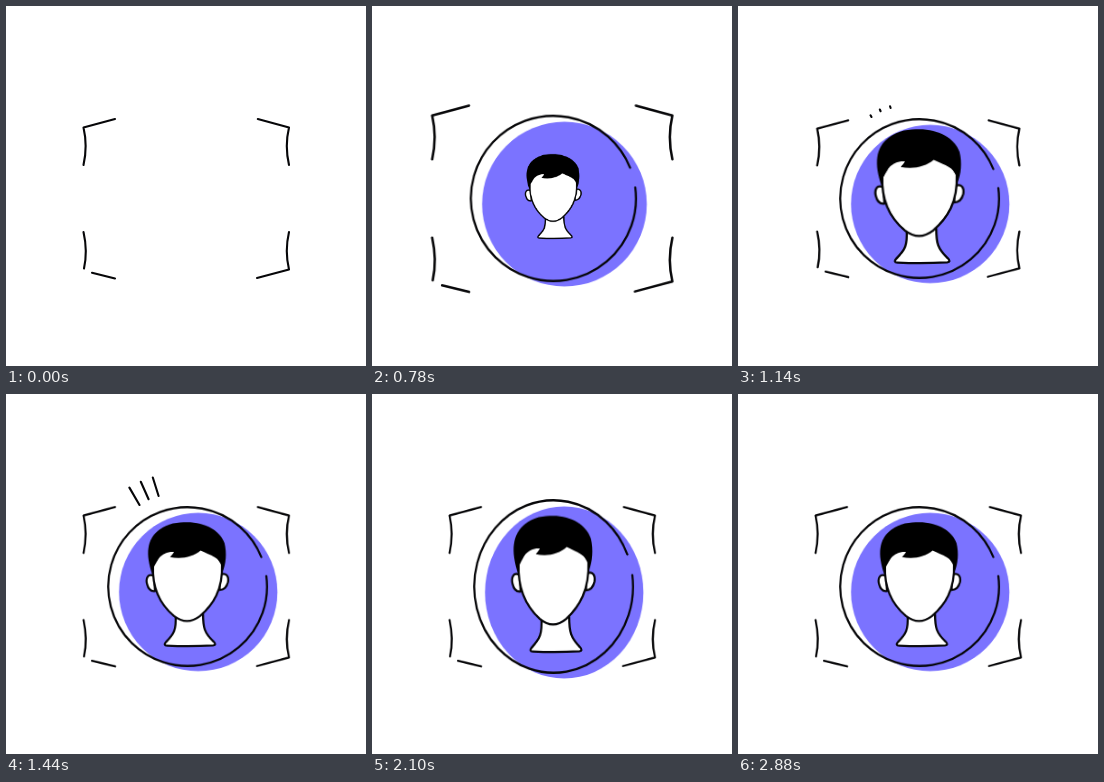
Write an HTML page that moves like this. It is 360x360 px and loops after 2910 ms.

```html
<!DOCTYPE html>
<html lang="en">
<head>
<meta charset="utf-8">
<title>Face scan</title>
<style>
  html, body { margin: 0; width: 100%; height: 100%; overflow: hidden; background: #fff; }
  svg { display: block; width: 100%; height: 100%; }
  .line { fill: none; stroke: #060608; stroke-width: 2.1; stroke-linecap: round; stroke-linejoin: round; }
  .skin { fill: #fff; }
  .trim { stroke-dasharray: 1 2; }

  .corners, .stretch, .disc, .disc-fill, .head, .tail, .tick {
    animation: 2910ms linear infinite;
  }
  .corners { transform-origin: 180.3px 192.5px; animation-name: push; }
  .stretch { transform-origin: 186px 193px; animation-name: stretch; }
  .disc { transform-origin: 186.5px 195.2px; animation-name: pop; }
  .disc-fill { animation-name: tint; }
  .head { transform-origin: 181px 190.3px; animation-name: face; }
  .tail { animation-name: tail; }
  .tick { animation-name: tick; }

  @keyframes push {
    0%, 20% { transform: scale(1); animation-timing-function: ease-in; }
    26.8% { transform: scale(1.168); animation-timing-function: ease-out; }
    29.9% { transform: scale(1.215); animation-timing-function: ease-in-out; }
    39.18% { transform: scale(.984); animation-timing-function: ease-in-out; }
    44%, 100% { transform: scale(1); }
  }
  @keyframes pop {
    0%, 14.4% { transform: scale(0); animation-timing-function: ease-in; }
    18.56% { transform: scale(.497); }
    22.7% { transform: scale(1); animation-timing-function: ease-out; }
    24.7% { transform: scale(1.06); animation-timing-function: ease-in-out; }
    26.8% { transform: scale(1.04); animation-timing-function: ease-in-out; }
    34%, 100% { transform: scale(1); }
  }
  @keyframes tint {
    0%, 18.6% { fill: #6259ff; }
    26.5%, 100% { fill: #7b73ff; }
  }
  @keyframes face {
    0%, 22% { transform: scale(0); animation-timing-function: ease-in; }
    26.8% { transform: scale(.675); animation-timing-function: ease-out; }
    32.5% { transform: scale(1.13); animation-timing-function: ease-in-out; }
    39.18% { transform: scale(1.08); animation-timing-function: ease-in-out; }
    46%, 62% { transform: scale(1); animation-timing-function: ease-in-out; }
    80.4% { transform: scale(1.02); animation-timing-function: ease-in-out; }
    88%, 100% { transform: scale(1); }
  }
  @keyframes stretch {
    0%, 56.7% { transform: scaleY(1); animation-timing-function: ease-in; }
    61.86% { transform: scaleY(1.046); animation-timing-function: ease-out; }
    67.4% { transform: scaleY(1.105); animation-timing-function: ease-in; }
    76.3% { transform: scaleY(1.053); animation-timing-function: ease-out; }
    80.1%, 100% { transform: scaleY(1); }
  }
  @keyframes tail {
    0%, 2% { stroke-dashoffset: 0; }
    11%, 19.2% { stroke-dashoffset: 1.1; }
    25%, 100% { stroke-dashoffset: 0; }
  }
  @keyframes tick {
    0%, 37.5% { stroke-dashoffset: 1.15; }
    39.18% { stroke-dashoffset: .91; animation-timing-function: ease-out; }
    46%, 54% { stroke-dashoffset: 0; animation-timing-function: ease-in; }
    60%, 100% { stroke-dashoffset: -1.15; }
  }
</style>
</head>
<body>
<svg viewBox="0 0 360 360">
  <g class="line corners">
    <path d="M109 113L77.5 121.5Q81.8 140 77.5 159"/>
    <path d="M251.8 113L283 121.5Q278.6 140 283 159"/>
    <path d="M283 226Q278.6 245 283 263.5L251 272"/>
    <path d="M77.5 226Q81.8 245 78 262.5"/>
    <path class="trim tail" pathLength="1" d="M86 266.8L109 272.4"/>
  </g>

  <g class="line">
    <path class="trim tick" pathLength="1" d="M133.5 111L123.4 93.6"/>
    <path class="trim tick" pathLength="1" d="M142.6 105.2L134.8 87.8"/>
    <path class="trim tick" pathLength="1" d="M152.6 102L146.8 83.5"/>
  </g>

  <g class="stretch">
    <g class="disc">
      <circle class="disc-fill" cx="192.2" cy="198" r="79.2"/>
      <path class="line" d="M260.3 182A79.4 79.4 0 1 1 255.3 163"/>
    </g>
    <g class="head">
      <g class="line">
        <!-- neck, ears, face -->
        <path class="skin" d="M169.5 220C170.5 236 168 240 160 248Q157 251.5 161 251.6Q184 252.6 207 251.4Q211 251 207.500 247.500C198.500 239 197 234 197 220Z"/>
        <path class="skin" d="M148 182C142 179 139.500 184 141 190Q143 198 149 197Z"/>
        <path class="skin" d="M214 181C220 178 223 182 222 188Q220 196 213.500 196Z"/>
        <path class="skin" d="M147 172C146 196 156 212 168 222Q181 232 194 222C207 211 217 196 216 170L204 150H160Z"/>
      </g>
      <path fill="#000" d="M146.500 181C139 160 141 145 153 136C162 129 172 128.300 181 128.300C200 128.300 214 137 218.500 149C221 159 220 170 216.500 178C216.500 168 211 163.500 202 160Q197 157.500 194.500 156.500C187 163 175 165.500 164 163Q166 161 168 158C157 157 147.500 166 146.500 181Z"/>
    </g>
  </g>
</svg>
</body>
</html>
```
